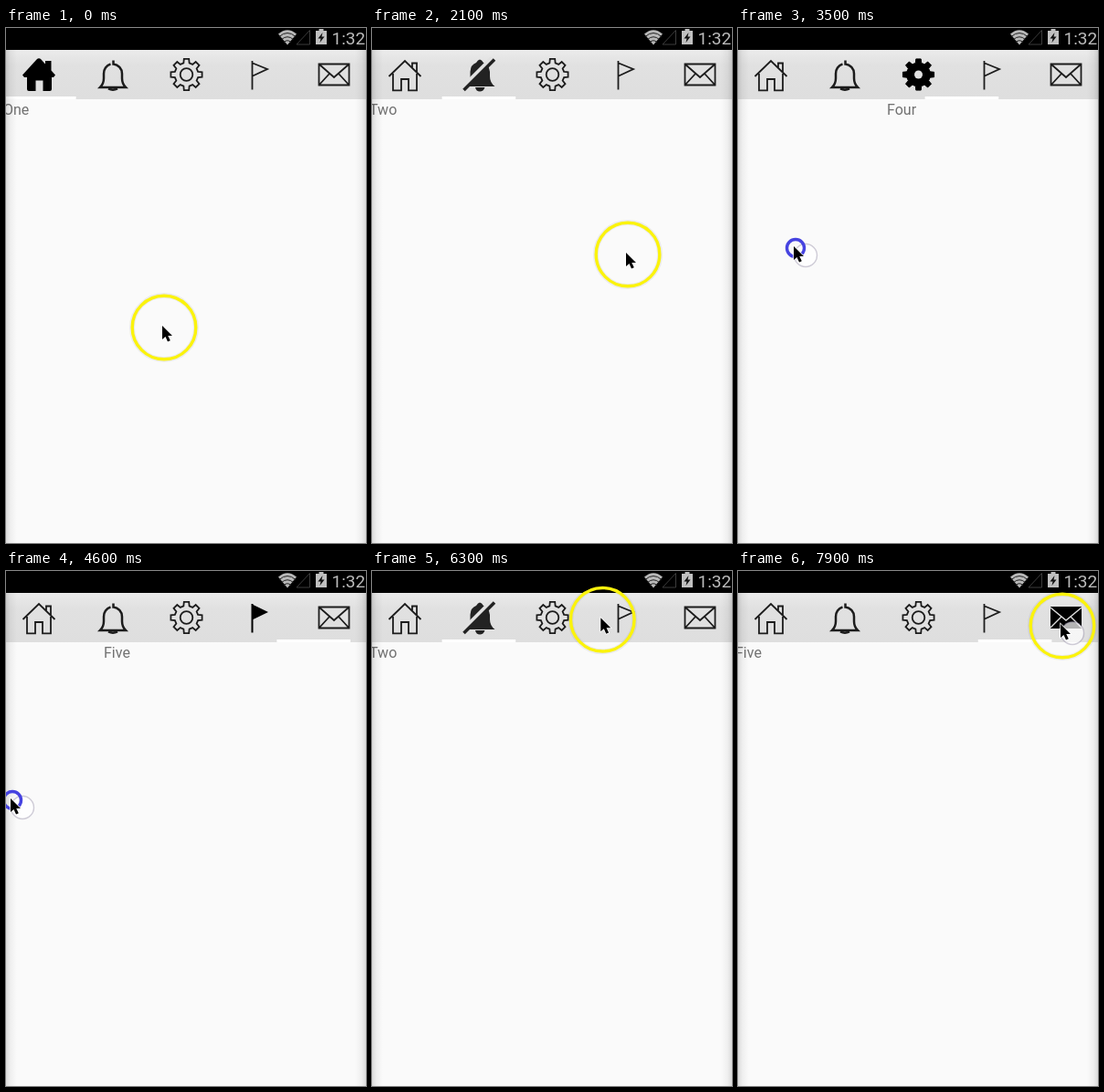
Write an HTML page that moves like this. It is 394 px wide and 564 px high and loops after 8 s.

```html
<!DOCTYPE html>
<html lang="en">
<head>
<meta charset="utf-8">
<title>Swipe tabs</title>
<style>
  html, body { margin: 0; width: 100%; height: 100%; overflow: hidden; background: #fafafa; }
  svg { display: block; width: 394px; height: 564px; font-family: Roboto, sans-serif; }
  .line { fill: none; stroke: #1c1c1c; stroke-width: 1.8; }
  .bold { stroke-width: 2.5; }
</style>
</head>
<body>
<svg viewBox="0 0 394 564">
  <defs>
    <linearGradient id="bar" x2="0" y2="1">
      <stop stop-color="#ebebeb"/><stop offset=".3" stop-color="#e1e1e1"/><stop offset="1" stop-color="#dedede"/>
    </linearGradient>
    <linearGradient id="edge">
      <stop stop-opacity=".13"/><stop offset=".4" stop-opacity=".045"/><stop offset="1" stop-opacity="0"/>
    </linearGradient>
  </defs>
  <rect width="394" height="564" fill="#fafafa"/>
  <g id="pages" font-size="16" fill="#717171"></g>
  <rect y="24" width="394" height="54" fill="url(#bar)"/>
  <rect id="mark" y="75" width="80.6" height="3" fill="#fff"/>

  <g class="tab">
    <path class="line" d="M18.5 53 36 36 53.5 53M44 43V38.500H49V48M23 50V68.300H32V56H40V68.300H49V50"/>
    <path d="M18 51.500 33.500 34.500Q36 32 38.500 34.500L43 39.500V36H49.500V46.500L54 51.500 52 54H50V67Q50 69 48 69H40.500V57.500H32.500V69H25Q23 69 23 67V54H20Z"/>
  </g>
  <g class="tab">
    <path class="line bold" d="M114.500 39.500A10.500 10.500 0 0 0 107 50V55Q107 61 103 65H131Q127 61 127 55V50A10.500 10.500 0 0 0 117.500 39.500V35.500M112 66.500Q117 69 122 66.500"/>
    <g fill="#222">
      <path d="M103 64Q107.500 60 107.500 53V48Q108 40 114 38 118 31 122 38 128 40 129 48V53Q129 60 134.500 64ZM113 65H123.500Q122 69.500 118 69.500 114 69.500 113 65Z"/>
      <path d="M99 66.500 132 33.500" stroke="#e1e1e1" stroke-width="6.500"/>
      <path d="M100.500 68 134 34.500" stroke="#222" stroke-width="3.600"/>
    </g>
  </g>
  <g class="tab">
    <g class="line"><path class="gear"/><circle cx="197.500" cy="51" r="6.800"/></g>
    <g><path class="gear" stroke="#000"/><circle cx="197.500" cy="51" r="4.500" fill="#e1e1e1"/></g>
  </g>
  <g class="tab">
    <path class="line" d="M269.500 36V67.500M270 38.500 286 45 270 52.500"/>
    <path d="M268.500 36H270.500V37L287 45 270.500 53V67.500H268.500Z"/>
  </g>
  <g class="tab">
    <path class="line" d="M342.500 39.500H375.500V62.500H342.500ZL359 54 375.500 39.500M342.500 62.500 354 50M375.500 62.500 364 50"/>
    <g><path d="M342 39H376V63H342Z"/><path d="M342 40 359 54 376 40M342 62 354 50M376 62 364 50" fill="none" stroke="#ddd" stroke-width="1.400"/></g>
  </g>

  <rect y="24" width="12" height="540" fill="url(#edge)"/>
  <rect y="24" width="12" height="540" fill="url(#edge)" transform="matrix(-1 0 0 1 394 0)"/>

  <rect width="394" height="24" fill="#000"/>
  <path d="M298 6.500Q308-2 318 6.500L308 18.500Z" fill="#b8b8b8"/>
  <path d="M299 9.500Q308 1.500 317 9.500M301.500 12.500Q308 7 314.500 12.500M304 15.500Q308 12 312 15.500" fill="none" stroke="#222"/>
  <path d="M318 18H332.500V2.500Z" fill="none" stroke="#3c3c3c"/>
  <path d="M339 3H342.500V1H347.500V3H351V18H339Z" fill="#c0c0c0"/>
  <path d="M346.500 5 341.500 11.500H344.500L343.500 16 348.500 9.500H345.500Z" fill="#111"/>
  <text x="356.500" y="17.500" font-size="19" fill="#bbb">1:32</text>

  <circle id="touch" r="12.500" fill="#fff" fill-opacity=".7" stroke="#5a5078" stroke-opacity=".28" stroke-width="1.400"/>
  <g id="pointer">
    <circle id="halo" r="35" fill="none" stroke="#000" stroke-opacity=".06" stroke-width="6"/>
    <circle id="ring" fill="none" stroke-width="3.400"/>
    <path d="M-2-2V13L1.500 10 4 15.500 6.800 14.300 4.300 9H9Z" stroke="#fff" stroke-width="1.400" paint-order="stroke"/>
  </g>
</svg>
<script>
const $ = id => document.getElementById(id);
const LOOP = 8000, LEFT = -4, WIDTH = 403, TAB = WIDTH / 5;
const FLICK = 100, HOLD = 300, GLIDE = 500, SLOP = 6;

// each drag turns one page; each tap jumps to a tab
const drags = [
  { at: 1300, from: [240, 297], to: [50, 272] },
  { at: 2600, from: [280, 248], to: [60, 245] },
  { at: 3400, from: [306, 244], to: [63, 241] },
  { at: 4500, from: [306, 252], to: [7, 251] }
];
const taps = [
  { at: 5800, spot: [117, 47], tab: 1 },
  { at: 6700, spot: [268, 54], tab: 3 },
  { at: 7800, spot: [355, 60], tab: 4 }
];

const clamp = v => Math.min(1, Math.max(0, v));
const smooth = u => (u = clamp(u), u * u * (3 - 2 * u));
const easeOut = u => 1 - (1 - clamp(u)) ** 3;
const mix = (a, b, u) => a + (b - a) * u;

// the pointer glides to each place, then rests until the next move
const moves = [
  { start: 0, time: 800, to: [268, 308] },
  { start: 900, time: 200, to: drags[0].from }
];
drags.forEach(({ at, to }, i) => {
  const next = drags[i + 1] ? drags[i + 1].from : taps[0].spot;
  moves.push({ start: at, time: FLICK, to }, { start: at + HOLD, time: GLIDE, to: next });
});
taps.slice(1).forEach(({ spot }, i) =>
  moves.push({ start: taps[i].at + 100, time: GLIDE, to: spot }));

const presses = [
  ...drags.map(d => [d.at, d.at + HOLD]),
  ...taps.map(p => [p.at - 100, p.at + 100])
];

function pointerAt(t) {
  let spot = [173, 328];
  for (const { start, time, to } of moves) {
    const u = smooth((t - start) / time);
    spot = spot.map((v, i) => mix(v, to[i], u));
  }
  return spot;
}

function stateAt(t) {
  let page = 0, selected = 0;
  for (const { at, from } of drags) {
    if (t <= at) break;
    const end = at + HOLD;
    const moved = clamp((from[0] - SLOP - pointerAt(Math.min(t, end))[0]) / WIDTH);
    page = selected + mix(moved, 1, easeOut((t - end) / 300));
    if (t >= end) selected++;
  }
  let mark = page;
  for (const { at, tab } of taps) {
    if (t < at) break;
    mark = mix(selected, tab, smooth((t - at) / 270));
    page = selected = tab;
  }
  return { page, selected, mark };
}

const pages = ["One", "Two", "Three", "Four", "Five"].map(word => {
  const text = document.createElementNS("http://www.w3.org/2000/svg", "text");
  text.textContent = word;
  text.setAttribute("y", 94.5);
  return $("pages").appendChild(text);
});

const teeth = [];
for (let k = 0; k < 8; k++)
  for (const [deg, r] of [[-14, 13], [-9, 17.3], [9, 17.3], [14, 13]]) {
    const a = (k * 45 + deg) * Math.PI / 180;
    teeth.push([197.5 + r * Math.cos(a), 51 + r * Math.sin(a)]);
  }
document.querySelectorAll(".gear").forEach(g => g.setAttribute("d", "M" + teeth.join("L") + "Z"));

const tabs = [...document.querySelectorAll(".tab")];
const show = (el, on) => el.setAttribute("visibility", on ? "visible" : "hidden");
const place = (el, x, y) => el.setAttribute("transform", `translate(${x} ${y})`);

function draw(t) {
  const { page, selected, mark } = stateAt(t);
  pages.forEach((el, i) => el.setAttribute("x", LEFT + 1 + WIDTH * (i - page)));
  $("mark").setAttribute("x", LEFT + TAB * mark);
  tabs.forEach((tab, i) => {
    show(tab.children[0], i !== selected);
    show(tab.children[1], i === selected);
  });

  const pressed = linger => presses.some(([a, b]) => t > a && t < b + linger);
  const down = pressed(0), [x, y] = pointerAt(t);
  place($("pointer"), x, y);
  place($("touch"), x + 11, y + 8);
  show($("touch"), pressed(100));
  show($("halo"), !down);
  $("ring").setAttribute("r", down ? 9.5 : 34.8);
  $("ring").setAttribute("stroke", down ? "#4643e0" : "#fbf30c");
}

const start = performance.now();
function tick() {
  draw(Math.floor((performance.now() - start) % LOOP / 100) * 100);
  requestAnimationFrame(tick);
}
tick();
</script>
</body>
</html>
```
